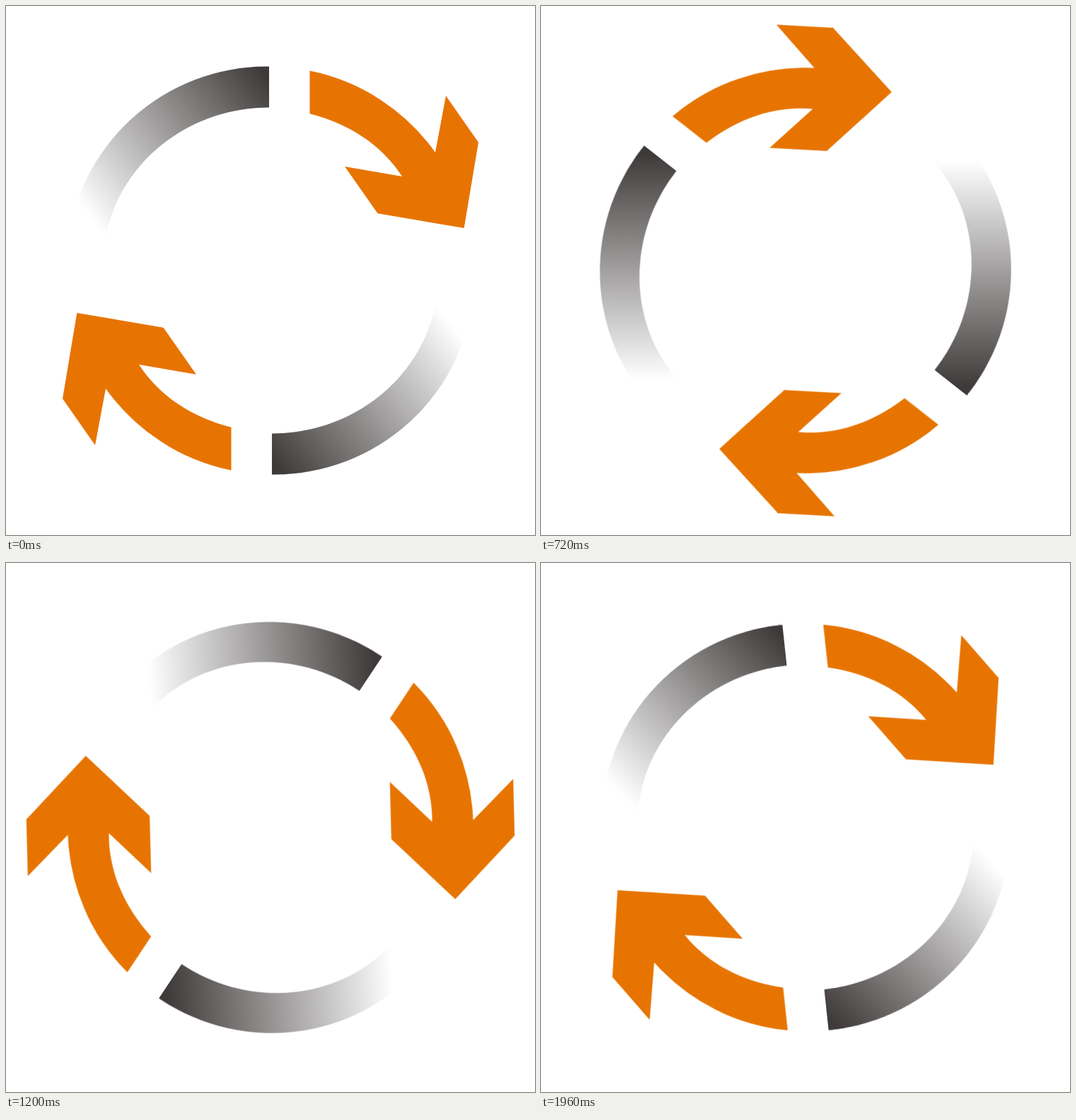
Write an HTML page that moves like this. It is 748 by 748 pixels and loops after 2 s.

```html
<!DOCTYPE html>
<html lang="en">
<head>
<meta charset="utf-8">
<title>Turning arrows</title>
<style>
  html, body {
    margin: 0;
    width: 100%;
    height: 100%;
    overflow: hidden;
    background: #fff;
  }
  svg {
    display: block;
    width: 100vw;
    height: 100vh;
  }

  /* One turn is 59 equal steps; every sixth step is skipped,
     so ten blocks of five 40 ms poses fill the 2 s loop. */
  :root { --step: calc(360deg / 59); }
  .blocks, .poses { transform-origin: 0 0; }
  .blocks { animation: blocks 2000ms steps(10) -1961ms infinite; }
  .poses { animation: poses 200ms steps(5) -161ms infinite; }

  @keyframes blocks {
    from { transform: rotate(0deg); }
    to { transform: rotate(calc(60 * var(--step))); }
  }
  @keyframes poses {
    from { transform: rotate(var(--step)); }
    to { transform: rotate(calc(6 * var(--step))); }
  }
</style>
</head>
<body>
<svg viewBox="-374 -374 748 748" aria-hidden="true">
  <defs>
    <linearGradient id="fade" gradientUnits="userSpaceOnUse"
      x1="129.9" y1="-101.8" x2="-122" y2="95.6">
      <stop offset="0" stop-color="#3e3a39"/>
      <stop offset="1" stop-color="#fff"/>
    </linearGradient>
    <g id="half">
      <path fill="url(#fade)" d="M-2-288.4A283 283 0 0 0-288-25.2
        L-236.3-20.6C-228.3-142.7-122-230.5-2-230.5Z"/>
      <path fill="#e77400" d="M55.5-282.4A287.8 287.8 0 0 1 233-167
        L248-247 294-181.3 273.7-60 151.5-80.7 105-147 186-133
        C156.8-178.8 108.2-208.5 55.5-221.7Z"/>
    </g>
  </defs>
  <g class="blocks">
    <g class="poses">
      <use href="#half"/>
      <use href="#half" transform="rotate(180)"/>
    </g>
  </g>
</svg>
</body>
</html>
```
